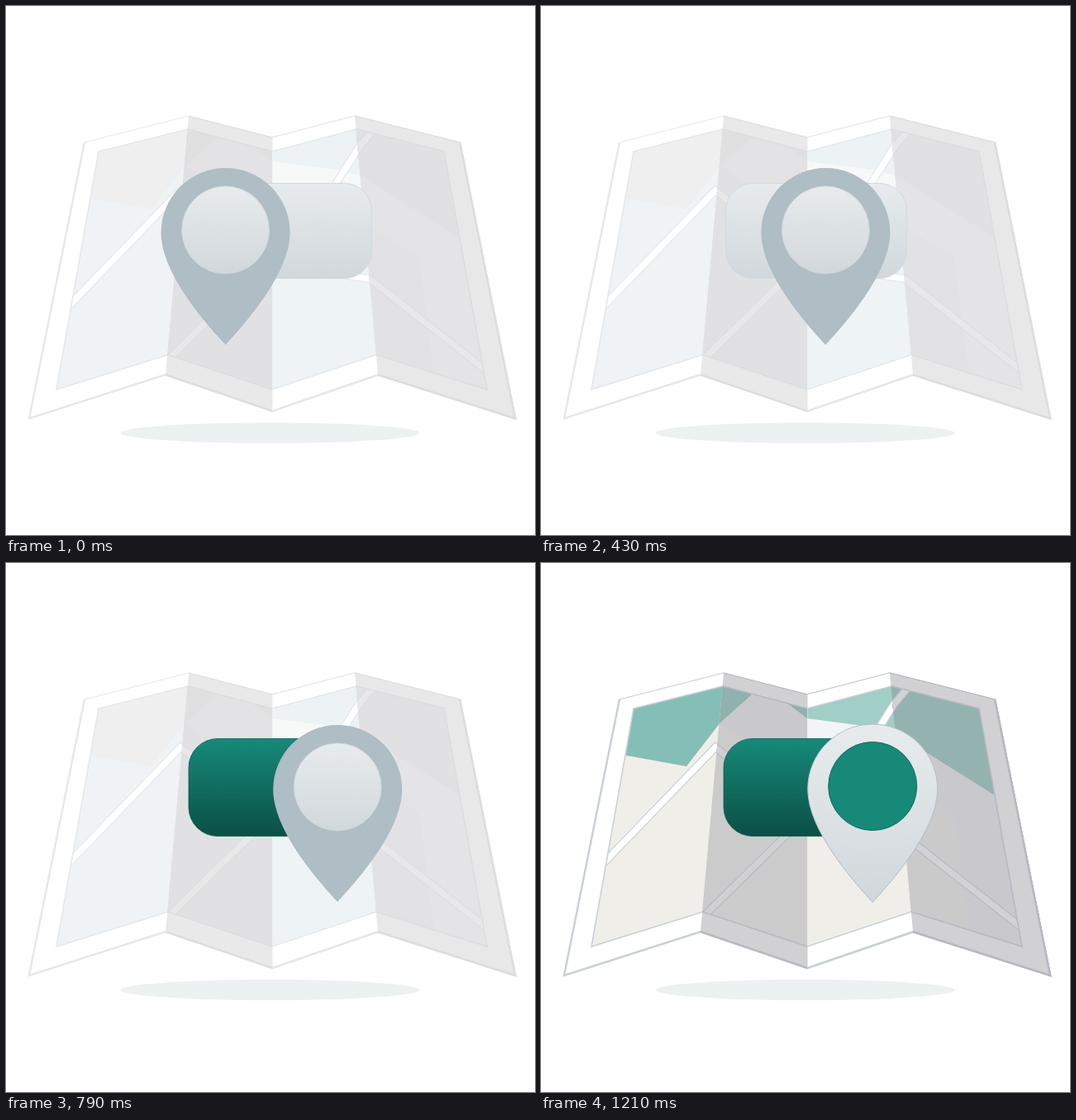
Write an HTML page that moves like this. It is 640 by 640 pixels and loops after 3210 ms.

```html
<!DOCTYPE html>
<html>
<head>
<meta charset="utf-8">
<style>
html, body { margin: 0; height: 100%; overflow: hidden; background: #fff }
svg { display: block; width: 100%; height: 100% }
</style>
</head>
<body>
<svg viewBox="0 0 640 640">
  <defs>
    <linearGradient id="pale" x2="0" y2="1"><stop stop-color="#e7ebed"/><stop offset="1" stop-color="#d1d8dc"/></linearGradient>
    <linearGradient id="green" x2="0" y2="1"><stop stop-color="#178a7a"/><stop offset="1" stop-color="#0b4f45"/></linearGradient>
    <clipPath id="inner"><path d="M112 176L220 149 322 176 424 149 530 176 582 464 448 422 322 464 196 422 61 464Z"/></clipPath>
    <clipPath id="fold0"><path d="M0 120H640V510H0Z"/></clipPath>
    <clipPath id="fold1"><path d="M222.2 120H640V510H187.3Z"/></clipPath>
    <clipPath id="fold2"><path d="M322.5 120H640V510H322.5Z"/></clipPath>
    <clipPath id="fold3"><path d="M420.8 120H640V510H455.7Z"/></clipPath>
  </defs>
  <ellipse cx="319.5" cy="516.5" rx="181" ry="12.5" fill="#edf1f2"/>
  <g id="greyMap"></g>
  <g id="colorMap"></g>
  <rect x="223.5" y="214.5" width="219" height="115" rx="33" fill="url(#pale)" stroke="#d3d9dc"/>
  <rect id="block" x="221" y="212.5" width="224" height="118" rx="35" fill="url(#green)" stroke="#0d6156" stroke-width=".8"/>
  <g id="pin">
    <path d="M0 410C-20 388-78 325-78 274A78 78 0 0 1 78 274C78 325 20 388 0 410Z" fill="#afbdc4"/>
    <circle cy="271" r="53" fill="url(#pale)" stroke="#cbd3d7" stroke-width=".8"/>
    <g id="colorPin">
      <path d="M0 410.5C-20 388-78.5 325-78.5 273.5A78.5 78.5 0 0 1 78.5 273.5C78.5 325 20 388 0 410.5Z" fill="url(#pale)" stroke="#b3bec6"/>
      <circle cy="270" r="53.5" fill="#178979" stroke="#0e6e61"/>
    </g>
  </g>
</svg>
<script>
const $ = id => document.getElementById(id);

// Each fold paints over everything to its right.
// Colours: margin, land, band, park, road, line
const panel = ([margin, land, band, park, road, line], i) => `
<g clip-path="url(#fold${i})" fill="none" stroke="${line}">
  <path d="M95 165L221 133 322 159 422 133 549 165 616 499 450 446 322 490 193 446 28 499Z" fill="${margin}"/>
  <path d="M549 165L616 499 450 446 322 490 193 446 28 499 95 165" stroke-width="2.4"/>
  <g clip-path="url(#inner)">
    <path d="M50 130H600V480H50Z" fill="${land}" stroke="none"/>
    <path d="M217 194L254 160 560 130 600 480 522 480 500 302 443 270 245 212Z" fill="${band}" stroke="none"/>
    <path d="M85 229.6L176 246 217 193 254 160 256 130H85ZM297 169L322 188 405 199 428 205 560 288V130H297Z" fill="${park}" stroke="none"/>
    ${[[line, 10], [road, 7.6]].map(([c, w]) => `<path d="M70 369L211 223 245 250M190 434L300 326M380 245L427 171 447 147M405 325L440 330 590 448" stroke="${c}" stroke-width="${w}"/>`).join('')}
  </g>
  <path d="M112 176L220 149 322 176 424 149 530 176 582 464 448 422 322 464 196 422 61 464Z" stroke-width="1.6"/>
</g>`;

const draw = (id, rows) => {
  $(id).innerHTML = rows.map(r => r.split(' ').map(c => '#' + c)).map(panel).join('');
};
draw('greyMap', [
  'ffffff eff3f5 eff3f5 f0efef ffffff e5e8ea',
  'e9e9e9 e1e1e3 e3e2e4 e0e0e1 e8e8e9 dcdddf',
  'ffffff eef3f5 f7f9f8 edf2f4 ffffff e5e8ea',
  'e8e8e8 e2e2e5 e4e4e6 e1e1e3 e8e8ea dcdddf'
]);
draw('colorMap', [
  'ffffff f0eee9 f0eee9 85beb6 ffffff c9d1d7',
  'd1d0d2 cbcbcb c9c8cd 90b1ae d1d0d3 b5bac0',
  'ffffff efeee8 f3f4f7 a1cec7 ffffff c9d1d7',
  'd1d0d3 cacaca c9c8cd 93b2b0 d2d1d4 b5bac0'
]);

const ramp = (n, a, b) => Math.max(0, Math.min(1, (n - a) / (b - a)));

function frame(now) {
  // 14 steps a second, then a rest
  const t = Math.floor(now % 3210 / 10) * 10;
  const n = Math.min(17, Math.floor((t + 5) * .014));
  const x = n < 11 ? 265.6 + 14.25 * n - .1875 * n * n : 401.2;
  const tint = ramp(n, 11, 17);
  $('pin').setAttribute('transform', `translate(${x})`);
  $('block').setAttribute('opacity', ramp(n, 8, 11));
  $('colorMap').setAttribute('opacity', tint);
  $('colorPin').setAttribute('opacity', tint);
  requestAnimationFrame(frame);
}
const start = performance.now();
frame(0);
function loop() { frame(performance.now() - start); }
</script>
</body>
</html>
```
